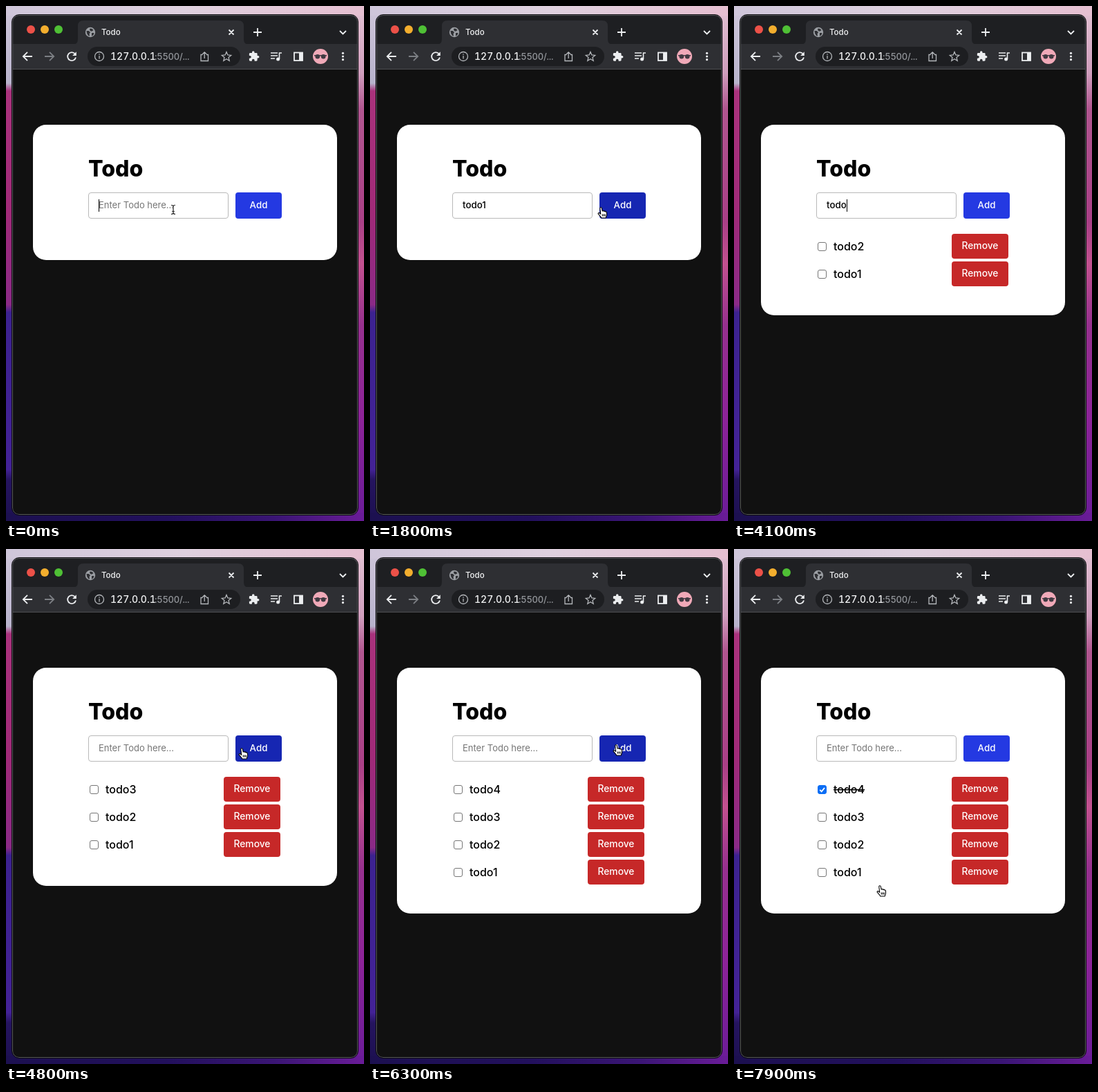
Recreate the animation shown at these times as an HTML page. Size 518 by 746 pixels, loop 8 s.

```html
<!DOCTYPE html>
<html lang="en">
<head>
<meta charset="utf-8">
<title>Todo</title>
<style>
html, body { margin: 0; width: 100%; height: 100%; overflow: hidden; background: #111; }
svg { display: block; width: 518px; height: 746px; font-family: Inter, "Open Sans", sans-serif; }
.line { fill: none; stroke: #eceef0; stroke-width: 1.8; }
.thin { stroke: #b4b7bb; stroke-width: 1.3; }
.btn { font-size: 13.3px; font-weight: 500; fill: #fff; text-anchor: middle; }
.item { font-size: 16px; font-weight: 500; }
.entry { font-size: 13.3px; font-weight: 500; }
.hint { font-size: 13px; fill: #757575; }
.url { font-size: 14px; font-weight: 500; font-feature-settings: "tnum"; }
</style>
</head>
<body>
<svg viewBox="0 0 518 746">
  <defs>
    <linearGradient id="left" x1="0" y1="0" x2="0" y2="1">
      <stop offset="0" stop-color="#cfc6da"/><stop offset=".15" stop-color="#b7b2cb"/>
      <stop offset=".165" stop-color="#a9327c"/><stop offset=".4" stop-color="#a02a78"/>
      <stop offset=".58" stop-color="#8a2a86"/><stop offset=".595" stop-color="#3c2290"/>
      <stop offset=".9" stop-color="#432296"/><stop offset=".92" stop-color="#25145f"/>
      <stop offset="1" stop-color="#1c1050"/>
    </linearGradient>
    <linearGradient id="right" x1="0" y1="0" x2="0" y2="1">
      <stop offset="0" stop-color="#e3c3d4"/><stop offset=".13" stop-color="#cf9dbc"/>
      <stop offset=".2" stop-color="#b0558f"/><stop offset=".42" stop-color="#a93f86"/>
      <stop offset=".5" stop-color="#c2518f"/><stop offset=".62" stop-color="#96308e"/>
      <stop offset=".8" stop-color="#8c2398"/><stop offset="1" stop-color="#6a1c98"/>
    </linearGradient>
    <linearGradient id="top">
      <stop offset="0" stop-color="#cfc6da"/><stop offset=".5" stop-color="#ded0de"/>
      <stop offset="1" stop-color="#e6bfd1"/>
    </linearGradient>
    <linearGradient id="bottom">
      <stop offset="0" stop-color="#1c1050"/><stop offset=".45" stop-color="#22105c"/>
      <stop offset=".75" stop-color="#3a1574"/><stop offset="1" stop-color="#6a1c98"/>
    </linearGradient>
    <clipPath id="win"><rect x="9" y="13" width="500" height="724" rx="10"/></clipPath>
  </defs>

  <rect width="260" height="746" fill="url(#left)"/>
  <rect x="260" width="258" height="746" fill="url(#right)"/>
  <rect width="518" height="14" fill="url(#top)"/>
  <rect y="734" width="518" height="12" fill="url(#bottom)"/>

  <g clip-path="url(#win)">
    <rect x="9" y="13" width="500" height="724" fill="#111"/>
    <rect x="9" y="13" width="500" height="43" fill="#1e1f22"/>
    <path d="M96 56q8 0 8-8V29q0-8 8-8H336q8 0 8 8V48q0 8 8 8Z" fill="#2e2f33"/>
    <rect x="9" y="55" width="500" height="37" fill="#2e2f33"/>
    <rect x="9" y="91" width="500" height="1" fill="#4c4d50"/>
  </g>
  <rect x="9.5" y="13.5" width="499" height="723" rx="9.5" fill="none" stroke="#56575b"/>
  <rect x="8.5" y="12.5" width="501" height="725" rx="10.5" fill="none" stroke="#0b0b0d"/>

  <circle cx="36" cy="34" r="6" fill="#ec5148"/>
  <circle cx="56" cy="34" r="6" fill="#f3ae2e"/>
  <circle cx="76" cy="34" r="6" fill="#4fc035"/>

  <circle cx="122" cy="38" r="7.2" fill="#9b9ea3"/>
  <path d="M116.500 36h3.500l2 2.500-1.500 1.500.5 3.500-2-.5-2-3.500ZM121.500 32.500l3 .5 2 2-2 1.500h-2l-1.500-2ZM124 39h3.500l-1 3-2.500 1.500Z" fill="#2e2f33"/>
  <text x="138" y="42" font-size="11.500" font-weight="500" fill="#f1f2f3">Todo</text>
  <path class="line" stroke-width="1.6" d="m322.500 34.500 7 7m0-7-7 7M358 38h12m-6-6v12M483 36l4.500 4.500L492 36"/>

  <path class="line" d="M38 73H25m6-6.200L24.800 73l6.200 6.200"/>
  <path class="line" style="stroke:#7c7f84" d="M56 73h13m-6-6.200L69.200 73 63 79.200"/>
  <path class="line" d="M99.800 69.300A6 6 0 1 0 101 74.500"/>
  <path d="M101.800 66.300v5.700h-5.700Z" fill="#eceef0"/>

  <rect x="118" y="59" width="221" height="28" rx="14" fill="#1d1e21"/>
  <circle class="line thin" cx="135" cy="73" r="6.500"/>
  <path class="line thin" d="M135 72v4.500M135 69.200v1.500"/>
  <text class="url" x="151" y="78" fill="#f1f2f3">127.0.0.1</text>
  <text class="url" x="215" y="78" fill="#94979c" style="font-size:13px;letter-spacing:-.25px">:5500/...</text>
  <path class="line thin" d="M284.500 70.500h-2.500v9h10.500v-9h-2.500M287.200 76v-9m-3 2.800 3-3 3 3"/>
  <path class="line thin" d="m319 66.500 1.900 4.500 4.800.4-3.700 3.200 1.200 4.800-4.200-2.600-4.200 2.600 1.200-4.800-3.700-3.200 4.800-.4Z"/>
  <path transform="translate(350.500 64.500) scale(.69)" fill="#eceef0" d="M20.500 11H19V7c0-1.100-.9-2-2-2h-4V3.500C13 2.100 11.900 1 10.500 1S8 2.100 8 3.500V5H4c-1.100 0-2 .9-2 2v3.800h1.500c1.500 0 2.700 1.200 2.700 2.700s-1.200 2.700-2.700 2.700H2V20c0 1.100.9 2 2 2h3.800v-1.500c0-1.500 1.200-2.700 2.700-2.700s2.700 1.200 2.700 2.700V22H17c1.100 0 2-.9 2-2v-4h1.500c1.400 0 2.500-1.100 2.500-2.500S21.900 11 20.500 11Z"/>
  <path class="line" style="stroke-width:1.6" d="M383 68h10m-10 4h10m-10 4h6M395.500 77v-9h3.500"/>
  <circle cx="393.600" cy="77" r="2.500" fill="#eceef0"/>
  <rect class="line" x="417" y="67.500" width="12" height="11.500"/>
  <rect x="424" y="67" width="5.500" height="12" fill="#eceef0"/>
  <circle cx="455" cy="73" r="11" fill="#f0a9b8"/>
  <g fill="#413a42">
    <path d="M446 71h18v1.500h-18Z"/><circle cx="450.800" cy="73.300" r="3.300"/><circle cx="459.200" cy="73.300" r="3.300"/>
  </g>
  <g fill="#eceef0">
    <circle cx="487.500" cy="68.300" r="1.600"/><circle cx="487.500" cy="73" r="1.600"/><circle cx="487.500" cy="77.700" r="1.600"/>
  </g>

  <rect id="card" x="39" y="172" width="440" height="196" rx="19" fill="#fff"/>
  <text x="119" y="247" font-size="32" font-weight="800">Todo</text>
  <rect x="119.500" y="270.500" width="202" height="37" rx="3.500" fill="#fff" stroke="#b9b9b9"/>
  <text id="field" x="134" y="293"></text>
  <rect id="caret" y="280" width="1" height="18"/>
  <rect id="add" x="332" y="270" width="67" height="38" rx="4"/>
  <text class="btn" x="365.500" y="293">Add</text>
  <g id="list"></g>

  <g id="mouse">
    <path id="hand" fill="#fff" stroke="#000" stroke-width="1.100" stroke-linejoin="round" d="M-1.200 1.200C-1.400-.6 1-.8 1.400 1L2.200 5.200C2.600 4.200 4.400 4.300 4.600 5.600 5.200 4.800 6.600 5 6.800 6.200 7.600 5.700 8.500 6.300 8.500 7.500V10.500C8.500 12 7.500 13 7.300 15H.8C.3 13.400-1.800 11.600-3.600 9.400-4.600 8-2.800 7-1.600 8.200L-.3 9.400ZM2.300 9.500v3M4.300 9.500v3M6.200 9.500v3"/>
    <path id="beam" fill="none" stroke="#222" stroke-width="1.200" d="M-3-6.500Q0-6.500 0-4.500Q0-6.500 3-6.500M0-5V5.500M-3 6.500Q0 6.500 0 4.500Q0 6.500 3 6.500M-1.800 2.500h3.600"/>
    <path id="arrow" stroke="#fff" d="M0 0V14L3.300 11 5.400 16 7.800 15 5.700 10.200H10Z"/>
  </g>
</svg>
<script>
const $ = id => document.getElementById(id);
const LOOP = 8000, STEP = 100;

// When each letter lands, and when the entry is added
const rounds = [
  { word: "todo1", keys: [300, 500, 600, 800, 1000], add: 2000 },
  { word: "todo2", keys: [2500, 2600, 2700, 2900, 3000], add: 3500 },
  { word: "todo3", keys: [3800, 3900, 4000, 4100, 4200], add: 4700 },
  { word: "todo4", keys: [5300, 5400, 5500, 5700, 5800], add: 6200 }
];
const focus = [0, 2450, 3700, 5250];
const hidden = [[300, 1400], [2500, 3100], [3800, 4400], [5300, 5900]];
const CHECK = 7500;

// time, x, y
const path = [
  [0, 242, 295], [1400, 242, 295], [1800, 334, 292], [2000, 342, 291], [2200, 342, 291],
  [2450, 284, 297], [3100, 284, 297], [3400, 343, 291], [3500, 343, 291],
  [3700, 288, 296], [4400, 288, 296], [4600, 341, 289], [5000, 341, 289],
  [5250, 285, 294], [5900, 285, 294], [6150, 356, 284], [6700, 356, 284],
  [7300, 128, 347], [7600, 128, 347], [7900, 211, 488]
];

const rows = rounds.map((r, i) => {
  const g = document.createElementNS("http://www.w3.org/2000/svg", "g");
  g.innerHTML = `<rect x="121.500" y="342.500" width="12" height="12" rx="2.500" fill="#fff" stroke="#767676"/>
    <path d="m124.300 348.800 2.400 2.500 4.300-5.300" fill="none" stroke="#fff" stroke-width="1.900"/>
    <text class="item" x="144" y="354">${r.word}</text>
    <rect x="315" y="330" width="82" height="36" rx="4" fill="#c62828"/>
    <text class="btn" x="356" y="352" style="font-size:13.800px">Remove</text>`;
  $("list").append(g);
  return g;
});

const show = (el, on) => el.setAttribute("visibility", on ? "visible" : "hidden");
const inside = (p, x0, y0, x1, y1) => p.x >= x0 && p.x < x1 && p.y >= y0 && p.y < y1;

function mouseAt(t) {
  const i = path.findIndex(p => p[0] > t);
  if (i < 0) return { x: path.at(-1)[1], y: path.at(-1)[2] };
  const [t0, x0, y0] = path[i - 1], [t1, x1, y1] = path[i];
  const u = (t - t0) / (t1 - t0), e = u * u * (3 - 2 * u);
  return { x: x0 + (x1 - x0) * e, y: y0 + (y1 - y0) * e };
}

function drawField(t, count) {
  const r = rounds[count];
  const typed = r ? r.word.slice(0, r.keys.filter(k => k <= t).length) : "";
  const f = $("field");
  f.textContent = typed || "Enter Todo here...";
  f.setAttribute("class", typed ? "entry" : "hint");
  const active = r && t >= focus[count];
  const last = typed ? r.keys[typed.length - 1] : focus[count];
  show($("caret"), active && (t - last) % 1000 < 500);
  $("caret").setAttribute("x", 134 + (typed ? Math.round(f.getComputedTextLength()) : 0));
}

function drawList(t, count) {
  $("card").setAttribute("height", 196 + 40 * count);
  rows.forEach((g, i) => {
    g.setAttribute("display", i < count ? "inline" : "none");
    g.setAttribute("transform", `translate(0 ${40 * (count - 1 - i)})`);
    const done = i === 3 && t >= CHECK;
    const [box, tick, label] = g.children;
    box.setAttribute("fill", done ? "#0b6ef5" : "#fff");
    box.setAttribute("stroke", done ? "#0b6ef5" : "#767676");
    tick.setAttribute("display", done ? "inline" : "none");
    label.setAttribute("text-decoration", done ? "line-through" : "none");
  });
}

function drawMouse(t, count) {
  const p = mouseAt(t);
  const onAdd = inside(p, 332, 270, 399, 308);
  const onField = inside(p, 119, 270, 322, 308);
  const onList = inside(p, 119, 330, 399, 332 + 40 * count);
  const seen = !hidden.some(([a, b]) => t >= a && t < b);
  $("add").setAttribute("fill", onAdd ? "#1626b2" : "#2439e2");
  $("mouse").setAttribute("transform", `translate(${p.x} ${p.y})`);
  show($("hand"), seen && (onAdd || onList));
  show($("beam"), seen && onField);
  show($("arrow"), seen && !onAdd && !onList && !onField);
}

function draw(now) {
  const t = Math.floor(now % LOOP / STEP) * STEP;
  const count = rounds.filter(r => r.add <= t).length;
  drawField(t, count);
  drawList(t, count);
  drawMouse(t, count);
}

const start = performance.now();
function tick() {
  draw(performance.now() - start);
  requestAnimationFrame(tick);
}
tick();
</script>
</body>
</html>
```
